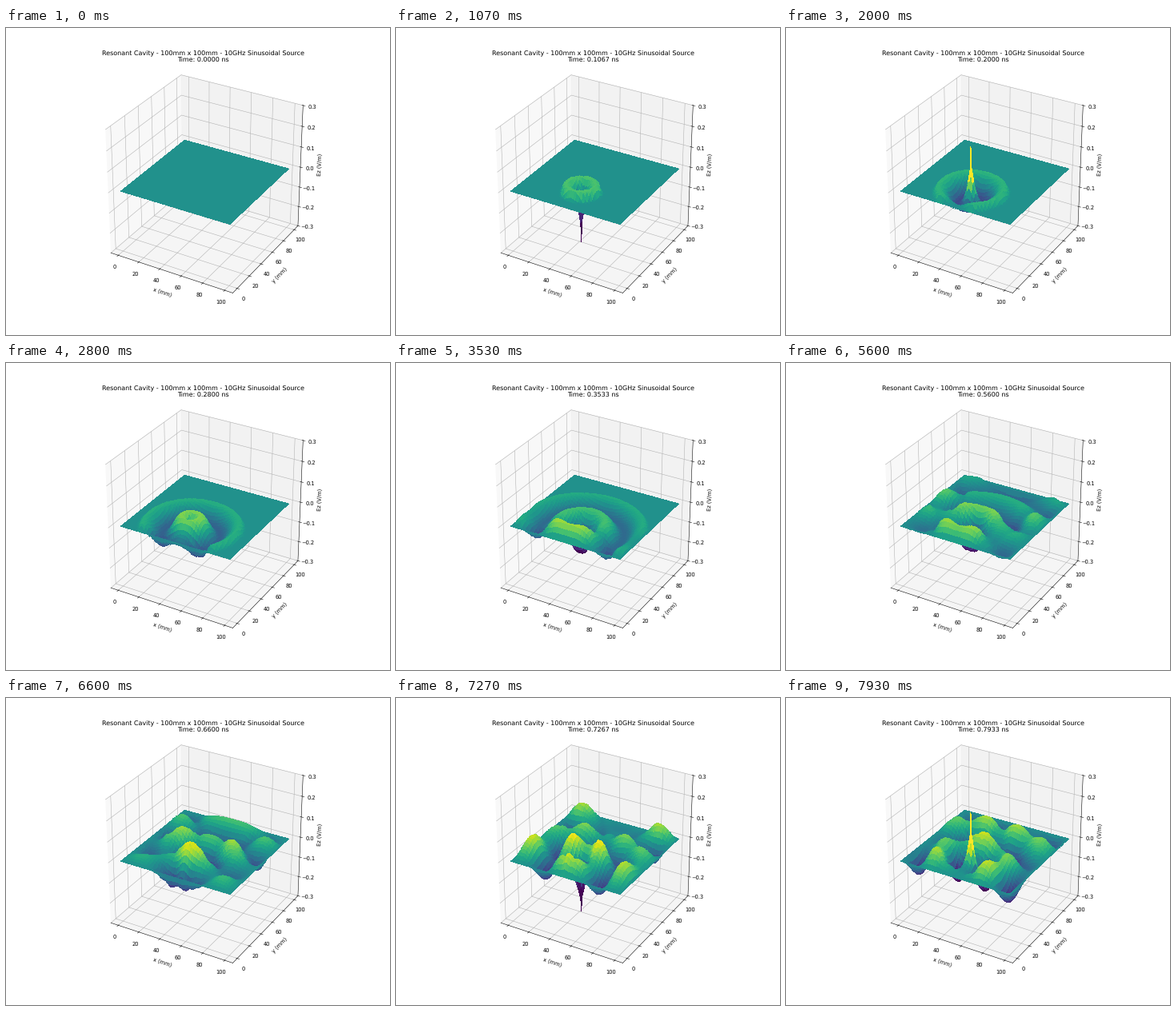
Write a matplotlib script that moves like this. It is 480 by 384 pixels and loops after 8000 ms.

```python
import numpy as np
import matplotlib.pyplot as plt
from matplotlib.animation import FuncAnimation
from mpl_toolkits.mplot3d.art3d import Poly3DCollection

LOOP_MS = 8000
SNAPSHOTS = 120
TICKS = SNAPSHOTS + 1     # the last snapshot is held for one more tick
NS_PER_SNAPSHOT = 1 / 150

N = 100                   # nodes per side
SRC = (50, 25)            # source node (x, y)
STEPS_PER_SNAPSHOT = 2
STEPS_PER_PERIOD = 60

plt.rcParams["text.hinting"] = "no_hinting"


def simulate():
    """2D TM field in a metal cavity, Courant number 0.5, soft sine source."""
    ez = np.zeros((N, N))
    hx = np.zeros((N, N - 1))
    hy = np.zeros((N - 1, N))
    fields = [ez.copy()]
    for step in range(1, (SNAPSHOTS - 1) * STEPS_PER_SNAPSHOT + 1):
        hx -= 0.5 * np.diff(ez, axis=1)
        hy += 0.5 * np.diff(ez, axis=0)
        ez[1:-1, 1:-1] += 0.5 * (np.diff(hy, axis=0)[:, 1:-1]
                                 - np.diff(hx, axis=1)[1:-1, :])
        ez[SRC] += np.sin(2 * np.pi * step / STEPS_PER_PERIOD)
        if step % STEPS_PER_SNAPSHOT == 0:
            fields.append(ez.copy())
    return fields


def patch_indices():
    """Node indices around the rim of every two-cell patch."""
    start = np.arange(0, N - 1, 2)
    row, col = (g.ravel()[:, None] for g in np.meshgrid(start, start, indexing="ij"))
    dr = np.array([0, 0, 0, 1, 2, 2, 2, 1])
    dc = np.array([0, 1, 2, 2, 2, 1, 0, 0])
    return np.minimum(row + dr, N - 1), np.minimum(col + dc, N - 1)


fields = simulate()
iy, ix = patch_indices()
coord = np.linspace(0, 100, N)
px, py = coord[ix], coord[iy]


def patches(field):
    return np.stack([px, py, field[ix, iy]], axis=-1)


fig = plt.figure(figsize=(10, 8), dpi=48)
ax = fig.add_subplot(111, projection="3d")
ax.set_box_aspect((1, 1, 1))

surface = Poly3DCollection(patches(fields[0]), cmap="viridis",
                           linewidth=0, antialiased=False)
surface.set_array(np.zeros(len(px)))
surface.set_clim(-0.1, 0.1)
ax.add_collection3d(surface)

pad = 5 + 110 / 48
ax.set_xlim(-pad, 100 + pad)
ax.set_ylim(-pad, 100 + pad)
ax.set_zlim(-0.3, 0.3)
ax.set_xlabel("x (mm)")
ax.set_ylabel("y (mm)")
ax.set_zlabel("Ez (V/m)")


def draw(tick):
    i = min(tick, SNAPSHOTS - 1)
    verts = patches(fields[i])
    surface.set_verts(verts)
    surface.set_array(verts[:, :, 2].mean(axis=1))
    ax.set_title("Resonant Cavity - 100mm x 100mm - 10GHz Sinusoidal Source\n"
                 f"Time: {i * NS_PER_SNAPSHOT:.4f} ns")
    return (surface,)


anim = FuncAnimation(fig, draw, frames=TICKS, interval=LOOP_MS / TICKS,
                     repeat=True, repeat_delay=0, cache_frame_data=False)
plt.show()
```
